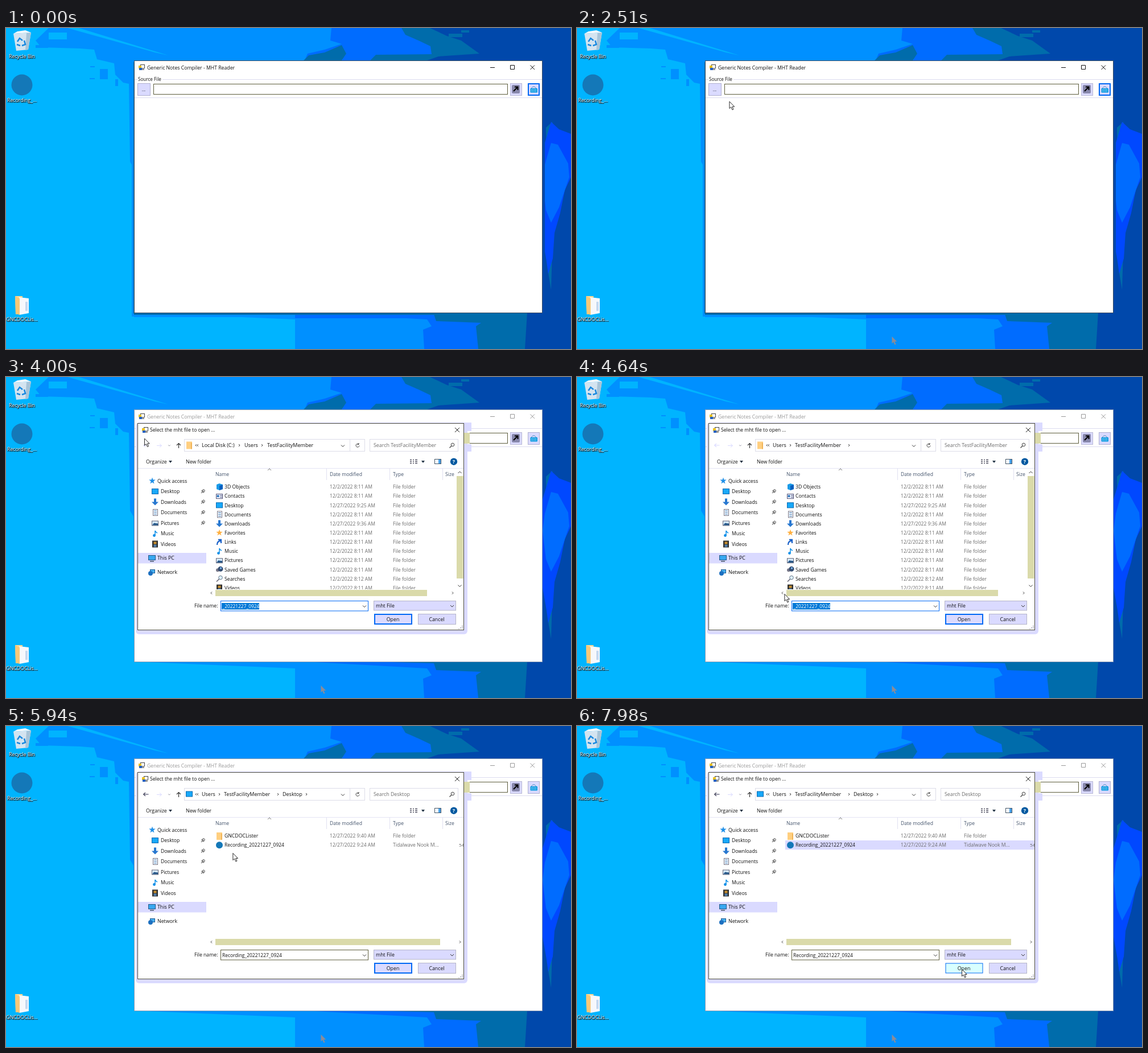
Write an HTML page that moves like this. It is 993 px wide and 564 px high and loops after 8 s.

```html
<!DOCTYPE html>
<html lang="en">
<head>
<meta charset="utf-8">
<title>Open file</title>
<style>
html, body { margin: 0; width: 100%; height: 100%; overflow: hidden; background: #0048ab; }
svg { display: block; width: 100vw; height: 100vh; font-family: "Open Sans", "Noto Sans", sans-serif; }
text { white-space: pre; }
.desk text { fill: #fff; text-anchor: middle; text-shadow: 0 1px 1px #000, 1px 1px 1px #000; }
</style>
</head>
<body>
<svg id="stage" viewBox="0 0 993 564" preserveAspectRatio="none"></svg>
<script>
const LAV = '#dadaff', HOT = '#d8ffff', BLUE = '#0068f4', OLIVE = '#dadaaa', INK = '#111', GREY = '#6c6c6c';
const SKY = '#00b4ff', AZURE = '#0090ff', COBALT = '#006cff', TEAL = '#006cab', NAVY = '#0048ab';

const rect = (x, y, w, h, fill, more = '') => `<rect x="${x}" y="${y}" width="${w}" height="${h}" fill="${fill}" ${more}/>`;
const box = (x, y, w, h, fill, line, lw = 1, more = '') =>
  rect(x + lw / 2, y + lw / 2, w - lw, h - lw, fill, `stroke="${line}" stroke-width="${lw}" ${more}`);
const poly = (pts, fill) => `<polygon points="${pts}" fill="${fill}"/>`;
const line = (d, color = INK, w = 1, more = '') => `<path d="${d}" fill="none" stroke="${color}" stroke-width="${w}" ${more}/>`;
const disc = (x, y, r, fill) => `<circle cx="${x}" cy="${y}" r="${r}" fill="${fill}"/>`;
const text = (x, y, s, fill = INK, size = 8.8, more = '') => `<text x="${x}" y="${y}" fill="${fill}" font-size="${size}" ${more}>${s}</text>`;
const mid = (x, y, s, size = 8.8) => text(x, y, s, INK, size, 'text-anchor="middle"');
const group = (id, body, more = '') => `<g id="${id}" ${more}>${body}</g>`;
const chevron = (x, y, dir, c = '#333', s = 2) => line({
  right: `M${x - s / 2} ${y - s}l${s} ${s}l${-s} ${s}`,
  left: `M${x + s / 2} ${y - s}l${-s} ${s}l${s} ${s}`,
  down: `M${x - s * 1.5} ${y - s / 2}l${s * 1.5} ${s * 1.5}l${s * 1.5} ${-s * 1.5}`,
  up: `M${x - s * 1.5} ${y + s / 2}l${s * 1.5} ${-s * 1.5}l${s * 1.5} ${s * 1.5}`
}[dir], c);
const arrow = (x, y, c) => line(`M${x - 4} ${y}h8.5M${x - 1} ${y - 3}l-3.4 3l3.4 3`, c, 1.1);
const appIcon = (x, y) => box(x + 3, y, 8, 7, '#fff', '#444') + rect(x, y + 2, 5, 5, '#e8c020') +
  rect(x + 1, y + 6, 5, 4, '#2460c0') + rect(x + 6, y + 6, 4, 4, '#999');

// Small icons, centred on x, y
const icons = {
  cube: (x, y) => poly(`${x - 5},${y - 4} ${x},${y - 6} ${x + 6},${y - 4} ${x + 6},${y + 4} ${x},${y + 6} ${x - 5},${y + 4}`, '#1a9be8') +
    poly(`${x},${y - 2} ${x + 6},${y - 4} ${x + 6},${y + 4} ${x},${y + 6}`, '#0860c0'),
  card: (x, y) => box(x - 6, y - 4, 12, 9, '#e8f0ff', '#557') + disc(x - 2.5, y, 2, '#2470b8') + line(`M${x + 1} ${y - 1}h4M${x + 1} ${y + 2}h4`, '#557'),
  screen: (x, y) => box(x - 6, y - 5, 12, 10, '#18a8f8', '#0868b0'),
  page: (x, y) => box(x - 4, y - 6, 9, 12, '#fff', '#778') + line(`M${x - 2} ${y - 3}h5M${x - 2} ${y}h5M${x - 2} ${y + 3}h5`, '#3878b8'),
  down: (x, y) => poly(`${x - 2},${y - 6} ${x + 2},${y - 6} ${x + 2},${y} ${x + 6},${y} ${x},${y + 6} ${x - 6},${y} ${x - 2},${y}`, '#2878d0'),
  star: (x, y, c = '#ffb040') => poly([...Array(10)].map((_, i) => {
    const r = i % 2 ? 2.4 : 6, a = i * Math.PI / 5;
    return `${(x + r * Math.sin(a)).toFixed(1)},${(y - r * Math.cos(a)).toFixed(1)}`;
  }).join(' '), c),
  link: (x, y) => line(`M${x - 4} ${y + 5}q0 -7 7 -7M${x - 2} ${y - 4}h5v6`, '#1860c8', 2.2),
  note: (x, y) => line(`M${x} ${y + 3}v-8q1 3 4 4`, '#1090e8', 1.5) + disc(x - 1.5, y + 3.5, 2.4, '#1090e8'),
  photo: (x, y) => box(x - 6, y - 4, 12, 9, '#d8ecff', '#667') + poly(`${x - 5},${y + 4} ${x - 2},${y} ${x + 5},${y + 1} ${x + 5},${y + 4}`, '#285888'),
  game: (x, y) => disc(x - 3, y + 1, 3, '#778') + disc(x + 2, y - 1, 4.5, '#334c70') + rect(x + 1, y - 4, 3, 3, '#80b8f0'),
  lens: (x, y) => line(`M${x - 5} ${y + 5}l5 -5`, '#667', 1.6) + `<circle cx="${x + 2}" cy="${y - 2}" r="3.3" fill="#e0f4ff" stroke="#678"/>`,
  film: (x, y) => rect(x - 5, y - 6, 10, 12, '#303030') + rect(x - 2.5, y - 4, 5, 4, '#c89030') + rect(x - 2.5, y + 1, 5, 4, '#5080b0'),
  folder: (x, y) => rect(x - 5, y - 6, 10, 13, '#ffcf80') + rect(x + 3, y - 4, 2, 11, '#f0b458'),
  pc: (x, y) => box(x - 6, y - 5, 13, 9, '#38a8f0', '#245888') + rect(x - 3, y + 5, 7, 1.5, '#456'),
  net: (x, y) => box(x - 3, y - 5, 9, 7, '#48b0f0', '#1c5890') + disc(x - 2, y + 2, 4, '#1c70c0'),
  ball: (x, y) => disc(x, y, 6, '#1478b8')
};
const pin = y => line(`M343 ${y + 3}l3 -3M343.5 ${y - 1.5}l4 4M345 ${y - 2}l2.5 -1.5l2 2l-1.5 2.5z`, '#777', 1.1);

function wallpaper() {
  return rect(0, 0, 993, 564, NAVY) +
    poly('0,0 745,0 775,14 800,22 832,45 760,50 740,57 740,500 916,500 912,564 0,564', TEAL) +
    poly('0,0 695,0 702,12 725,22 746,32 748,46 650,47 640,57 640,500 752,503 756,515 835,518 826,524 830,564 0,564', COBALT) +
    poly('0,0 572,0 570,22 590,28 560,38 530,45 525,57 525,500 740,512 748,524 733,530 735,564 0,564', AZURE) +
    poly('523,57 532,48 560,43 590,30 598,45 590,57', TEAL) +
    poly('0,0 75,0 52,22 62,34 130,36 155,38 160,55 190,62 192,82 206,96 216,98 218,235 224,245 226,500 508,512 508,564 0,564', SKY) +
    poly('108,0 128,0 285,48 262,43', SKY) + rect(75, 8, 32, 12, SKY) + rect(52, 30, 22, 5, AZURE) +
    rect(148, 67, 8, 2, AZURE) + rect(147, 88, 9, 2, AZURE) + rect(165, 72, 14, 18, AZURE) + rect(192, 90, 5, 12, AZURE) +
    rect(800, 4, 14, 4, TEAL) + rect(778, 10, 24, 6, TEAL) +
    poly('949,175 960,165 966,182 958,460 953,430', TEAL) +
    poly('958,165 972,178 993,186 993,262 982,285 974,325 964,360 961,405 953,432 950,410 943,370 943,215', '#0048ff') +
    poly('958,202 970,205 988,238 990,262 972,315 958,342 949,320 943,270 947,240', COBALT);
}

function desktop() {
  const bin = poly('13,10 44,8 39,38 18,40', '#d4e4f0') + poly('13,10 44,8 34,4 20,6', '#f4f8fc') + poly('36,9 44,8 39,38 34,39', '#a8c4d8') +
    line('M20 24l4 -6l5 4M32 22l2 7l-6 2M25 31l-6 -2', '#1888e0', 2.5);
  const dir = poly('16,471 29,471 29,502 17,503', '#ffd894') + poly('23,473 40,475 40,501 24,504', '#f6f8fc') + rect(34, 481, 4, 16, '#c4d8f0') + poly('16,471 24,475 24,504 17,502', '#f8c878');
  return group('desk', bin + disc(28, 100, 18.5, '#1478b8') + dir + text(28, 53, 'Recycle Bin', '#fff') +
    text(28, 130, 'Recording_...', '#fff') + text(28, 515, 'GNCDOCLis...', '#fff'), 'class="desk"');
}

// Drop shadow of the active window, in the flat tones of the wallpaper
const shade = () => rect(221, 235, 4, 272, AZURE) + rect(225, 501, 283, 7, AZURE) + rect(508, 501, 232, 9, COBALT) +
  rect(224, 60, 1, 442, TEAL) + rect(225, 501, 600, 3, TEAL) + rect(943, 58, 4, 447, NAVY);

function mainWindow() {
  return group('shade', shade()) +
    box(225, 57, 718, 444, '#fff', '#3c5064', 1, 'id="frame"') + appIcon(233, 64) +
    group('caption', text(248, 72.5, 'Generic Notes Compiler - MHT Reader', 'currentColor', 8.7) +
      line('M851 69.5h8M886.5 65.5h7v7h-7zM921.5 65.5l7.5 7.5M929 65.5l-7.5 7.5', 'currentColor')) +
    line('M226 90.5h5M275 90.5h667M226 122.5h716', '#dcdcf0') + text(232, 93, 'Source File', INK, 8.1) +
    box(231, 97, 23, 22, LAV, '#b0b0d0', 1, 'id="browse"') + mid(242, 111, '...', 8) +
    box(259, 98, 623, 19, '#fff', '#5c5c3c') +
    box(886, 97, 21, 22, LAV, '#b8b8d4') + rect(889, 100, 14, 15, '#8888ac', 'rx="2"') + line('M892 111l7 -7M894 103.5h5.5v5.5', '#000', 2) +
    box(917, 97, 21, 22, LAV, '#b0b0d0') + group('focus', box(917, 97, 21, 22, LAV, BLUE, 2)) +
    rect(921.5, 106, 12.5, 7.5, '#109ce0', 'rx="1"') +
    line('M923 108.5h9.5M923 111h9.5', '#b8e8ff', 1, 'stroke-dasharray="1.5 1"') + line('M923 106q4.5 -6 9 0', '#4088c0') +
    group('tip', box(243, 122, 77, 18, '#fff', '#888') + text(247, 134, 'Open source file', '#555', 8.4));
}

const rowY = i => 193 + 16.15 * i;
const row = ([icon, name, date, kind = 'File folder'], i) => {
  const y = rowY(i);
  return icons[icon](375, y) + text(384, y + 3.2, name, INK, /_/.test(name) ? 8.45 : 8.7) +
    text(569, y + 3.2, date, GREY, 8.55) + text(680, y + 3.2, kind, GREY, 8.65);
};
const early = '12/2/2022 8:11 AM';
const home = [
  ['cube', '3D Objects', early], ['card', 'Contacts', early], ['screen', 'Desktop', '12/27/2022 9:25 AM'], ['page', 'Documents', early],
  ['down', 'Downloads', '12/27/2022 9:36 AM'], ['star', 'Favorites', early], ['link', 'Links', early], ['note', 'Music', early],
  ['photo', 'Pictures', early], ['game', 'Saved Games', early], ['lens', 'Searches', '12/2/2022 8:12 AM'], ['film', 'Videos', early]];
const desk = [['folder', 'GNCDOCLister', '12/27/2022 9:40 AM'], ['ball', 'Recording_20221227_0924', '12/27/2022 9:24 AM', 'Tidalwave Nook M...']];
const places = [['screen', 'Desktop'], ['down', 'Downloads'], ['page', 'Documents'], ['photo', 'Pictures'], ['note', 'Music'], ['film', 'Videos']];
const user = 'TestFacilityMember';

function dialog() {
  const crumb = (x, s) => text(x, 123.3, s, INK, 9);
  const frame = rect(228, 80, 583, 372, LAV, 'rx="6"') + rect(805, 80, 13, 15, LAV) + rect(805, 118, 13, 13, LAV) + rect(805, 98, 10, 19, OLIVE) +
    box(231, 81, 574, 364, '#fff', '#4c4c3c') + appIcon(239, 88) + text(253, 96, 'Select the mht file to open ...', INK, 8.6) +
    line('M789 89l8 8M797 89l-8 8', '#222');
  const bar = arrow(246, 120, LAV) + line('M265 120.5h8.5M270 117.5l3.4 3l-3.4 3', LAV) + line('M303.5 125v-8M300 120l3.5 -3.5l3.5 3.5', '#333', 1.2) +
    box(313, 109, 318, 22, '#fff', '#dcdce8') + line('M604.5 109v22', '#dcdce8') + chevron(334, 120, 'left', '#333', 1.8) + chevron(337, 120, 'left', '#333', 1.8) +
    chevron(592, 120.5, 'down') + line('M620 118a3 3 0 1 0 1 2.5M620 116v2.5h-2.5', '#444') + box(639, 109, 156, 22, '#fff', '#dcdce8') +
    `<circle cx="785" cy="119" r="2.8" fill="none" stroke="#444"/>` + line('M783 121l-3.5 3.5', '#444', 1.2);
  const tools = text(246, 151.7, 'Organize') + poly('286,147 292,147 289,151', '#234') + text(316, 151.7, 'New folder') +
    line('M710 145.5h3M715 145.5h2M719 145.5h4M710 148.5h3M715 148.5h2M719 148.5h4M710 151.5h3M715 151.5h2M719 151.5h4', '#556', 1.6) +
    poly('730,147 736,147 733,151', '#234') + box(753, 144, 12, 9, '#fff', '#456') + rect(760, 145, 4, 7, '#48a0e8') +
    disc(787, 148.7, 6.2, '#0058a0') + text(787, 152, '?', '#fff', 9, 'text-anchor="middle" font-weight="700"') + line('M232 160.5h572', '#e4e4f4');
  const side = icons.star(257, 182.5, '#2090e8') + text(266, 185.6, 'Quick access') + places.map(([ic, s], i) => {
    const y = 201 + 18.5 * i;
    return icons[ic](262, y) + text(272, y + 3.2, s, INK, 8.6) + (i < 4 ? pin(y) : '');
  }).join('') + rect(232, 309, 120, 18.5, LAV) + icons.pc(256, 318) + text(266, 321.2, 'This PC') + icons.net(256, 343) + text(266, 346, 'Network') +
    group('expand', chevron(240, 318, 'right', '#b8b8c8'));
  const heads = [[368, 'Name'], [569, 'Date modified'], [680, 'Type'], [772, 'Size']].map(([x, s]) => text(x, 174, s, '#44546c', 8.6)).join('') +
    line('M563.5 161v20M674.5 161v20M767.5 161v20', '#e0e0f0') + chevron(463, 163, 'up', '#777');
  const listA = group('listA', `<g clip-path="url(#cut)">${home.map(row).join('')}</g>` + rect(792, 174, 11.5, 180, OLIVE) +
    chevron(797.5, 168, 'up') + chevron(797.5, 366.5, 'down') + rect(368, 374, 372, 11, OLIVE) + chevron(785, 379.5, 'right'));
  const listB = group('listB', desk.map(row).join('') + text(796, rowY(1) + 3.2, '54', GREY, 8) + rect(368, 374, 395, 11, OLIVE) + chevron(798, 379.5, 'right'));
  const foot = chevron(361, 379.5, 'left') + text(331, 405, 'File name:', INK, 8.7) + box(377, 393, 260, 18.5, '#fff', BLUE, 1, 'id="field"') +
    group('nameA', rect(379, 397, 66, 11.5, '#0078d7') + text(380.5, 405.7, '_20221227_0924', '#fff', 8.35)) +
    group('nameB', text(380, 405.7, 'Recording_20221227_0924', INK, 8.45)) + chevron(630, 402.5, 'down') +
    box(646, 393, 145, 17.5, LAV, '#b4b4c8') + text(650, 405.2, 'mht File') + chevron(784, 402, 'down') +
    box(647, 416, 67, 19, LAV, BLUE, 2, 'id="open"') + mid(680, 428.6, 'Open') + box(724, 416, 67, 19, LAV, '#b4b4c8') + mid(757, 428.6, 'Cancel') +
    line('M802 437v6M799 440v3M796 442v1', '#889', 1.5, 'stroke-dasharray="1.5 1.5"');
  const paths = group('pathA', crumb(344, 'Local Disk (C:)') + chevron(410, 120, 'right') + crumb(419, 'Users') + chevron(450, 120, 'right') + crumb(459, user)) +
    group('pathB', crumb(344, 'Users') + chevron(375, 120, 'right') + crumb(383, user) + chevron(478, 120, 'right')) +
    group('pathC', arrow(246, 120, '#445') + crumb(486, 'Desktop') + text(646, 123.3, 'Search Desktop', GREY)) +
    group('pathEnd', chevron(528, 120, 'right')) + group('findA', text(646, 123.3, 'Search ' + user, GREY, 8.9)) +
    group('dirIcon', icons.folder(322, 119.5)) + group('deskIcon', icons.screen(322, 119.5)) + chevron(287, 120, 'down', '#99a', 1.2);
  return group('dialog', frame + bar + tools + paths + side + heads + rect(366, 0, 425, 16.2, HOT, 'id="hover"') + listA + listB + foot);
}

const arrowShape = '0,0 0,12.2 2.8,9.7 5,14.6 7,13.7 4.9,9 8.7,9';
const stage = document.getElementById('stage');
stage.innerHTML = '<clipPath id="cut"><rect x="360" y="182" width="432" height="191"/></clipPath>' +
  wallpaper() + desktop() + mainWindow() + dialog() +
  `<polygon id="ghost" points="${arrowShape}" transform="translate(553.5 542)" fill="#8c8c98"/>` +
  '<circle id="press" r="10" fill="#dcff50" opacity=".62"/>' +
  `<polygon id="cursor" points="${arrowShape}" fill="#fff" stroke="#111" stroke-width=".9"/>`;
const el = {};
stage.querySelectorAll('[id]').forEach(n => el[n.id] = n);
const show = (id, on) => el[id].style.display = on ? '' : 'none';
const set = (id, attrs) => { for (const k in attrs) el[id].setAttribute(k, attrs[k]); };

// Pointer stops: time, x, y
const stops = [[610, 553.5, 542], [1410, 278, 126], [1460, 277.5, 125.5], [1600, 277.5, 125.5], [1660, 277, 137], [1700, 277, 132],
  [1960, 277, 132], [1980, 268, 128], [2140, 268, 128], [2320, 277, 137], [2880, 243.5, 108], [4150, 243.5, 108], [4420, 290, 280],
  [4690, 372, 391], [4960, 398.8, 223.5], [5920, 398.8, 223.5], [6110, 401, 223], [6310, 401, 223], [6570, 440.5, 210.5], [7300, 440.5, 210.5], [7980, 676.5, 427.5]];

function pointer(t) {
  const i = stops.findIndex(s => s[0] > t);
  if (i < 0) return stops[stops.length - 1].slice(1);
  if (!i) return stops[0].slice(1);
  const [t0, x0, y0] = stops[i - 1], [t1, x1, y1] = stops[i];
  const u = (t - t0) / (t1 - t0), k = u * u * (3 - 2 * u);
  return [x0 + (x1 - x0) * k, y0 + (y1 - y0) * k];
}

function draw(t) {
  const [x, y] = pointer(t);
  const during = (a, b) => t >= a && t < b;
  const inside = (l, top, r, bottom) => x >= l && x < r && y >= top && y < bottom;
  const moved = t >= 5480, away = t >= 3620;
  show('ghost', t >= 610);
  show('cursor', t >= 610);
  set('cursor', { transform: `translate(${x} ${y})` });
  set('press', { cx: x, cy: y });
  show('press', during(3510, 3700) || during(5290, 5360) || during(5400, 5470) || during(6900, 7070));

  show('shade', !away);
  set('frame', { stroke: away ? '#8c9cb4' : '#3c5064' });
  el.caption.style.color = away ? '#999' : '#111';
  const over = t > 2160 && t < 3870 && inside(231, 97, 254, 119);
  set('browse', { fill: over && t < 3510 ? HOT : LAV, stroke: over ? '#2038c0' : '#b0b0d0' });
  show('focus', t < 3510);
  show('tip', during(3130, 3510));
  el.tip.style.opacity = Math.min(1, (t - 3090) / 120);

  show('dialog', t >= 3870);
  const k = Math.min(1, Math.max(0, (t - 3830) / 130)), scale = .94 + .06 * k;
  el.dialog.style.opacity = k;
  set('dialog', { transform: `translate(518 263) scale(${scale}) translate(-518 -263)` });
  show('pathA', t < 4040);
  show('pathB', t >= 4040);
  show('pathC', moved);
  show('pathEnd', t >= 5940);
  for (const id of ['findA', 'dirIcon', 'listA', 'nameA']) show(id, !moved);
  for (const id of ['deskIcon', 'listB', 'nameB']) show(id, moved);
  show('expand', during(4690, 5690));
  set('field', { stroke: moved ? (inside(377, 393, 637, 411) ? '#111' : '#5c5c3c') : BLUE });

  const picked = during(5290, 5480) || t >= 6900;
  const n = t >= 6900 ? 1 : Math.floor((y - 185) / 16.15);
  const onRow = t >= 4100 && x >= 366 && n >= 0 && n < (moved ? 2 : 12) && y < 373;
  show('hover', picked || onRow);
  set('hover', { y: rowY(n) - 8.1, width: moved ? 438 : 425, height: n === 11 ? 10 : 16.2, fill: picked ? LAV : HOT });
  const onOpen = moved && inside(647, 416, 714, 435);
  set('open', { fill: onOpen ? HOT : LAV, 'stroke-width': onOpen ? 1 : 2 });
}

const start = performance.now();
function tick() {
  draw((performance.now() - start) % 8000);
  requestAnimationFrame(tick);
}
tick();
</script>
</body>
</html>
```
